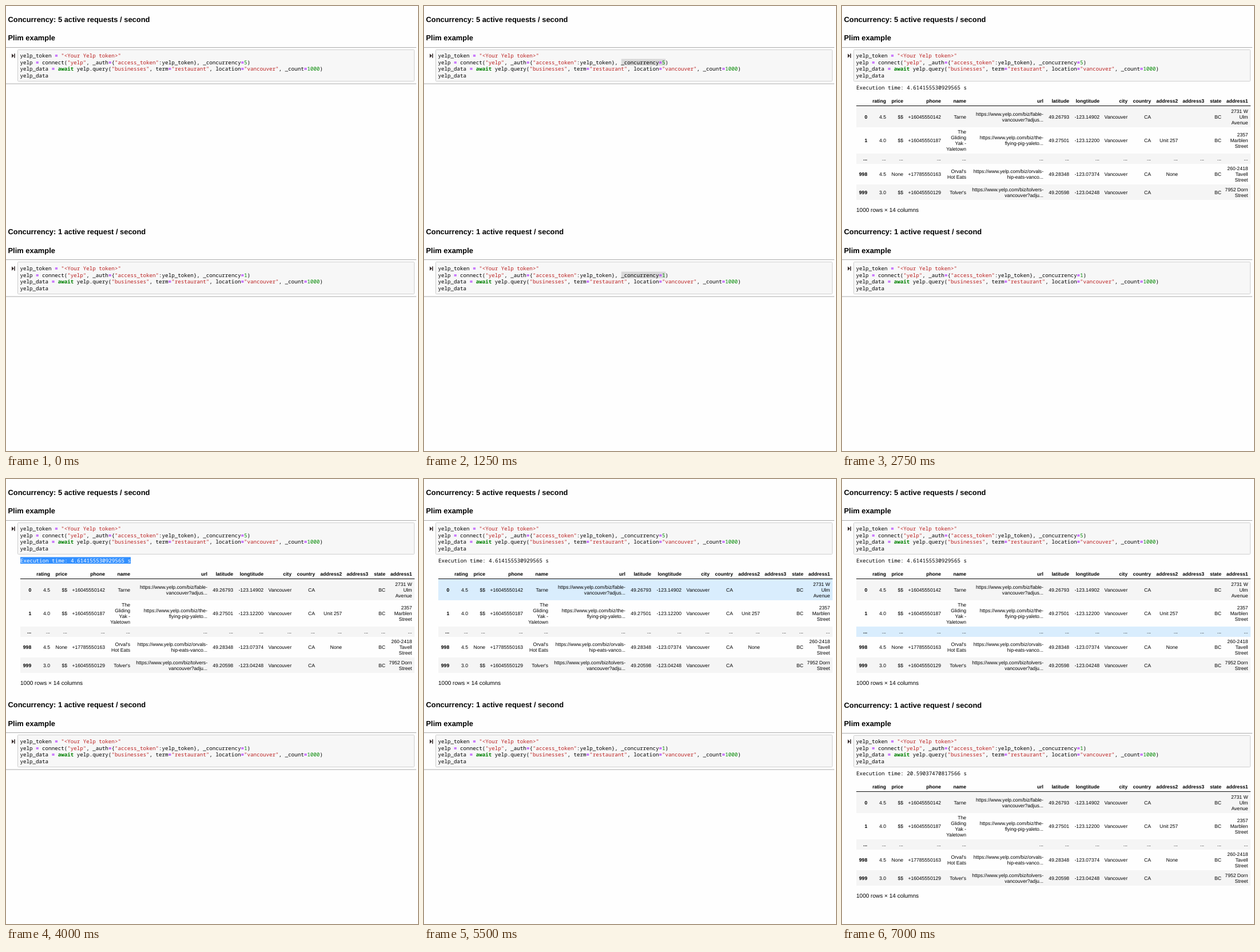
An HTML page that plays this animation: 720 px wide and 778 px high, repeating every 8 s.

```html
<!DOCTYPE html>
<html lang="en">
<head>
<meta charset="utf-8">
<title>Concurrency comparison</title>
<style>
  html, body { margin: 0; width: 100%; height: 100%; overflow: hidden; background: #fefefe; }
  svg { display: block; }
  text { font: 8.6px "Liberation Sans", Arial, sans-serif; white-space: pre; text-rendering: geometricPrecision; }
  .title { font-size: 12.9px; font-weight: bold; }
  .code { font: 9.2px "Noto Sans Mono", "DejaVu Sans Mono", monospace; }
  .summary { font-size: 10.04px; }
  .cell { text-anchor: end; }
  .bold { font-weight: bold; }
  .string { fill: #ba2121; }
  .operator { fill: #a2f; font-weight: bold; }
  .keyword { fill: #008000; font-weight: bold; }
  .number { fill: #080; }
  .rule { fill: #ababab; }
  .box { fill: #f7f7f7; stroke: #cfcfcf; }
</style>
</head>
<body>
<svg id="stage" width="720" height="778" viewBox="0 0 720 778"></svg>
<script>
const LOOP = 8000;
const PANEL_OFFSET = 372;
const COLUMN_RIGHTS = [44.2, 77, 107, 173, 217, 352, 397, 450, 499, 540, 587, 633, 663, 709.5];
const HEADER = ["", "rating", "price", "phone", "name", "url", "latitude", "longtitude",
  "city", "country", "address2", "address3", "state", "address1"];

// "|" separates the lines of a wrapped cell.
const ROWS = [
  { top: 175, height: 37, cells: ["0", "4.5", "$$", "+16045550142", "Tarne",
    "https://www.yelp.com/biz/fable-|vancouver?adjus...", "49.26793", "-123.14902",
    "Vancouver", "CA", "", "", "BC", "2731 W|Ulm|Avenue"] },
  { top: 212, height: 46, cells: ["1", "4.0", "$$", "+16045550187", "The|Gliding|Yak -|Yaletown",
    "https://www.yelp.com/biz/the-|flying-pig-yaleto...", "49.27501", "-123.12200",
    "Vancouver", "CA", "Unit 257", "", "BC", "2357|Marblen|Street"] },
  { top: 258, height: 18, cells: Array(14).fill("...") },
  { top: 276, height: 36, cells: ["998", "4.5", "None", "+17785550163", "Orval's|Hot Eats",
    "https://www.yelp.com/biz/orvals-|hip-eats-vanco...", "49.28348", "-123.07374",
    "Vancouver", "CA", "None", "", "BC", "260-2418|Tavell|Street"] },
  { top: 312, height: 27, cells: ["999", "3.0", "$$", "+16045550129", "Tolver's",
    "https://www.yelp.com/biz/tolvers-|vancouver?adju...", "49.20598", "-123.04248",
    "Vancouver", "CA", "", "", "BC", "7952 Dorn|Street"] },
];

const text = (x, y, content, attrs = "") => `<text x="${x}" y="${y}" ${attrs}>${content}</text>`;
const rect = (x, y, w, h, attrs) => `<rect x="${x}" y="${y}" width="${w}" height="${h}" ${attrs}/>`;

function highlight(line) {
  const kinds = ["string", "operator", "keyword", "number"];
  return line.replace(/("[^"]*")|(=)|\b(await)\b|\b(\d+)\b/g, (token, ...groups) =>
    `<tspan class="${kinds[groups.findIndex(Boolean)]}">${token}</tspan>`);
}

function codeLines(concurrency) {
  return [
    'yelp_token = "&lt;Your Yelp token&gt;"',
    `yelp = connect("yelp", _auth={"access_token":yelp_token}, _concurrency=${concurrency})`,
    'yelp_data = await yelp.query("businesses", term="restaurant", location="vancouver", _count=1000)',
    "yelp_data",
  ].map((line, i) => text(24.5, 90 + i * 11.67, highlight(line), 'class="code"')).join("");
}

function tableRow(id, { top, height, cells }, i) {
  const middle = top + height / 2 + 3;
  const labels = cells.map((cell, column) => {
    const lines = cell.split("|");
    const first = middle - (lines.length - 1) * 5;
    const style = `class="cell${column ? "" : " bold"}"`;
    return lines.map((line, n) => text(COLUMN_RIGHTS[column], first + n * 10, line, style)).join("");
  }).join("");
  return rect(25, top, 689, height, `id="${id}-row${i}" fill="${i % 2 ? "#fefefe" : "#f5f5f5"}"`) + labels;
}

function output(id, seconds) {
  const header = HEADER.map((name, i) => text(COLUMN_RIGHTS[i], 169, name, 'class="cell bold"')).join("");
  return `<g id="${id}-output">
    ${rect(25, 136.5, 193, 11.5, `id="${id}-timeMark" fill="#3390ff"`)}
    ${text(25, 145.5, `Execution time: ${seconds} s`, `id="${id}-time" class="code"`)}
    ${header}
    ${ROWS.map((row, i) => tableRow(id, row, i)).join("")}
    ${rect(25, 174, 689, 1, 'fill="#111"')}
    ${text(25, 360, "1000 rows × 14 columns", 'class="summary"')}
  </g>`;
}

function panel(id, offset, concurrency, noun, seconds) {
  return `<g transform="translate(0 ${offset})">
    ${text(3.5, 28, `Concurrency: ${concurrency} active ${noun} / second`, `id="${id}-title" class="title"`)}
    ${text(3.5, 60, "Plim example", 'class="title"')}
    ${rect(0, 72, 717, 1, `id="${id}-topRule" class="rule"`)}
    ${rect(0, 135.5, 717, 1, `id="${id}-bottomRule" class="rule"`)}
    ${rect(20.5, 76.5, 693, 55, `id="${id}-box" class="box" rx="1"`)}
    <path d="M10 83.3L14 87L10 90.7ZM14.2 83.3h1.6v7.4h-1.6Z" fill="#3a3030"/>
    ${rect(344.8, 92.5, 77.4, 11.5, `id="${id}-codeMark" fill="#d9d9d9"`)}
    ${codeLines(concurrency)}
    ${output(id, seconds)}
  </g>`;
}

document.getElementById("stage").innerHTML =
  panel("upper", 0, 5, "requests", "4.614155530929565") +
  panel("lower", PANEL_OFFSET, 1, "request", "20.59037470817566");

const part = name => document.getElementById(name);
const show = (name, visible) => { part(name).style.display = visible ? "" : "none"; };
const paint = (name, color) => { part(name).style.fill = color; };

function render(time) {
  const during = (start, end) => time >= start && time < end;
  const upperDone = time >= 2750;
  const lowerDone = time >= 7000;
  const timeSelected = during(4000, 5500);

  for (const [id, done] of [["upper", upperDone], ["lower", lowerDone]]) {
    show(`${id}-codeMark`, during(1250, 2750));
    show(`${id}-output`, done);
    show(`${id}-bottomRule`, !done);
  }
  show("upper-timeMark", timeSelected);
  show("lower-timeMark", false);
  paint("upper-time", timeSelected ? "#fff" : "");

  [[5500, 6250], [6250, 7000], [7000, LOOP]].forEach(([start, end], i) =>
    paint(`upper-row${i}`, during(start, end) ? "#d9edfd" : ""));

  // The lower cell settles one pixel down when its result arrives.
  const lift = lowerDone ? 0 : 1;
  part("lower-title").setAttribute("y", 28 - lift);
  part("lower-topRule").setAttribute("y", 72 - lift);
  part("lower-box").setAttribute("y", 76.5 - lift);
  part("lower-box").setAttribute("height", 55 + lift);
}

function tick() {
  render(performance.now() % LOOP);
  requestAnimationFrame(tick);
}
tick();
</script>
</body>
</html>
```
